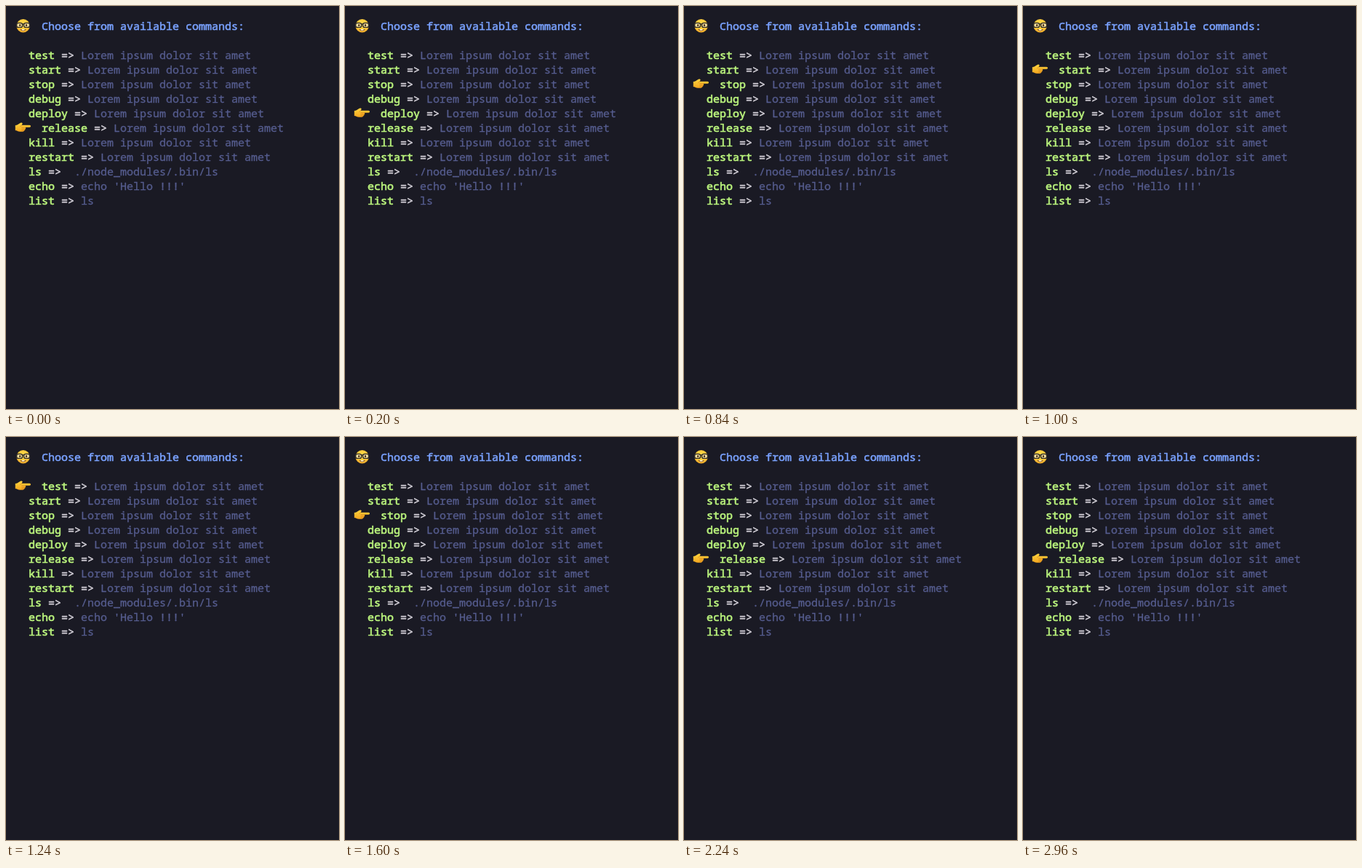
Recreate the animation shown at these times as an HTML page. Size 458x554 px, loop 3 s.

```html
<!DOCTYPE html>
<html lang="en">
<head>
<meta charset="utf-8">
<title>Command menu</title>
<style>
  html, body { margin: 0; width: 100%; height: 100%; overflow: hidden; background: #1a1a24; }
  svg { display: block; }
  text { font: 15px "Noto Sans Mono", "DejaVu Sans Mono", monospace; white-space: pre; stroke-width: .55px; stroke-linejoin: round; }
  .title { fill: #7aa2ff; stroke: #7aa2ff; }
  .name { fill: #b9f27c; stroke: #b9f27c; stroke-width: .7px; }
  .arrow { fill: #d3d0d8; stroke: #d3d0d8; }
  .info { fill: #565d8f; stroke: #565d8f; stroke-width: .3px; }
</style>
</head>
<body>
<svg id="stage" width="458" height="554" viewBox="0 0 458 554">
  <defs>
    <radialGradient id="skin" cx=".5" cy=".4" r=".6">
      <stop offset="0" stop-color="#ffe04f"/>
      <stop offset=".7" stop-color="#fcc93a"/>
      <stop offset="1" stop-color="#eba52a"/>
    </radialGradient>
    <linearGradient id="hand" x2="0" y2="1">
      <stop offset="0" stop-color="#ffd53f"/>
      <stop offset="1" stop-color="#f3a51f"/>
    </linearGradient>
  </defs>

  <g id="face">
    <circle cx="23.6" cy="27.2" r="9.2" fill="url(#skin)"/>
    <g fill="#efdc9a" stroke="#2d2a26" stroke-width="1.4">
      <rect x="14.6" y="23.4" width="8" height="6" rx="2.4"/>
      <rect x="24.6" y="23.4" width="8" height="6" rx="2.4"/>
      <path d="M22.4 25q1.2-.8 2.4 0" fill="none"/>
    </g>
    <g fill="#4a3018">
      <ellipse cx="19.2" cy="26.4" rx="1.1" ry="1.6"/>
      <ellipse cx="28" cy="26.4" rx="1.1" ry="1.6"/>
    </g>
    <path d="M19.4 31.4q4.2 1.5 8.4 0q-1 2.8-4.2 2.8t-4.2-2.8z" fill="#8a511b"/>
    <rect x="21.6" y="31.9" width="4" height="1.6" rx=".4" fill="#fff6dc"/>
  </g>

  <g id="pointer">
    <path d="M12.8 64C15.5 63.9 17 62.4 19.4 61C21.3 60 23.2 60.6 22.5 62L21.6 63.7H32.4C34.6 63.7 34.6 66.7 32.4 66.7H26.6C27.8 67.5 27.4 68.8 26.2 69C26.8 70 26.2 70.9 25 71.1C25 72.3 24.2 72.7 23 72.7H19.2C16.4 72.7 15.4 71.2 12.8 71Z" fill="url(#hand)"/>
    <path d="M21.6 63.8L19.6 65.6M26.6 66.8H21.6M26.2 69H21.8M25 71.1H21.8" fill="none" stroke="#cf7c17" stroke-width=".7" stroke-linecap="round"/>
  </g>

  <text class="title" x="49" y="33">Choose from available commands:</text>
</svg>

<script>
const LOOP = 3000, LINE = 20, INDENT = 18;
const lorem = 'Lorem ipsum dolor sit amet';
const commands = [
  ...['test', 'start', 'stop', 'debug', 'deploy', 'release', 'kill', 'restart'].map(name => [name, lorem]),
  ['ls', ' ./node_modules/.bin/ls'],
  ['echo', "echo 'Hello !!!'"],
  ['list', 'ls']
];

// [start time in ms, selected row]
const steps = [
  [0, 5], [120, 4], [400, 3], [680, 2], [960, 1], [1240, 0],
  [1440, 1], [1600, 2], [1760, 3], [1920, 4], [2080, 5]
];

const stage = document.getElementById('stage');
const pointer = document.getElementById('pointer');

function add(parent, tag, attrs, content = '') {
  const el = document.createElementNS('http://www.w3.org/2000/svg', tag);
  for (const key in attrs) el.setAttribute(key, attrs[key]);
  el.textContent = content;
  return parent.appendChild(el);
}

const rows = commands.map(([name, info], i) => {
  const row = add(stage, 'text', { x: 31, y: 73 + i * LINE });
  add(row, 'tspan', { class: 'name' }, name);
  add(row, 'tspan', { class: 'arrow' }, ' => ');
  add(row, 'tspan', { class: 'info' }, info);
  return row;
});

function draw(time) {
  const t = time % LOOP;
  const selected = steps.filter(([start]) => start <= t).pop()[1];
  rows.forEach((row, i) => row.setAttribute('x', 31 + (i === selected ? INDENT : 0)));
  pointer.setAttribute('transform', `translate(0 ${selected * LINE})`);
}

const begin = performance.now();
function tick() {
  draw(performance.now() - begin);
  requestAnimationFrame(tick);
}
draw(0);
requestAnimationFrame(tick);
</script>
</body>
</html>
```
